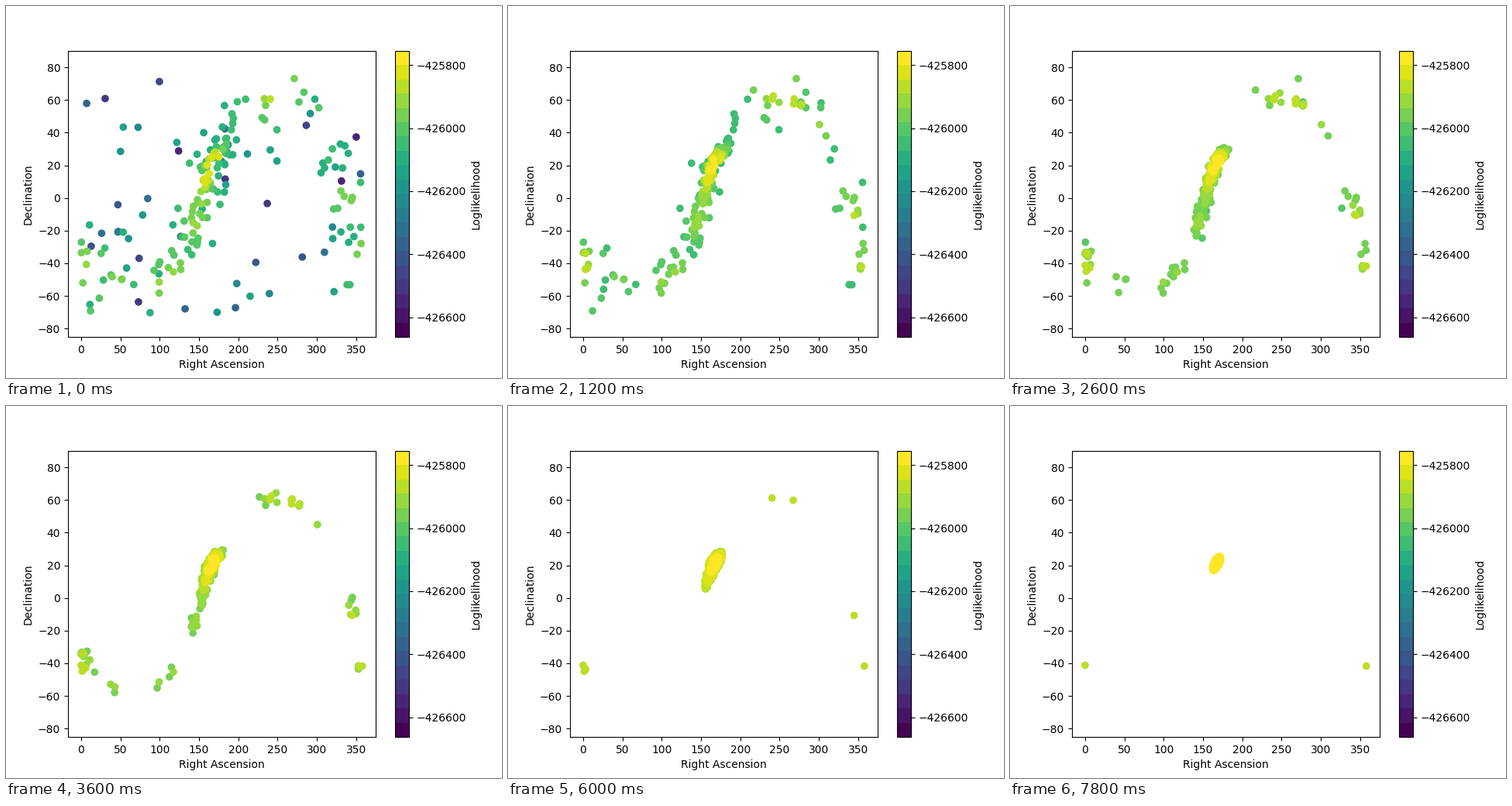
These frames come from a looping animation (640 by 480 pixels, 8 s). A matplotlib script:

```python
import numpy as np
import matplotlib.pyplot as plt
from matplotlib.animation import FuncAnimation

FRAMES, LIVE = 40, 200
LOW, HIGH = -426662.5, -425754.5      # log-likelihood range of the colour bar
rng = np.random.default_rng(11)

# Arcs of the ring that fade last: centre, half width, extra level
arcs = [(91, 17, .13), (128, 10, .13), (182, 13, .13), (228, 14, .14),
        (257, 7, .13), (297, 18, .12), (352, 25, .13)]

# Side maxima: ra, dec, level
spots = [(0, -41.2, 1), (358, -41.7, 1), (3, -43.8, .9), (345, -10.7, .9),
         (267.5, 59.9, .885), (240.5, 61.3, .88), (277.5, 57.2, .86),
         (2, -34, .865), (354.5, -42, .855)]


def threshold(k):
    """Lowest level that is still alive at step k."""
    return np.interp(k, [0, 1, 3, 9, 13, 23, 30, 39],
                     [0, .35, .62, .69, .745, .835, .87, .96])


def wrap(a):
    return (a + 180) % 360 - 180


def stack(ra, dec, level, is_spot=0):
    return np.column_stack([ra, dec, level, np.full(len(ra), is_spot)])


def ring(n, t):
    """Samples scattered about a tilted circle on the sky."""
    phi = np.where(rng.random(n) < .35, rng.normal(15, 32, n),
                   rng.uniform(0, 360, n))
    off = rng.normal(0, 2 + 10 * max(0, 1 - t / .75) ** 2, n)
    bump = np.max([h * np.exp(-(wrap(phi - c) / w) ** 4)
                   for c, w, h in arcs], axis=0)
    level = .69 + bump - .006 * np.abs(off) + rng.normal(0, .012, n)

    # the circle sags a little just past the main peak
    sag = 7 * np.exp(-(wrap(phi - 45) / 15) ** 2)
    a, lat, top = np.radians(phi), np.radians(off + 2.2 - sag), np.radians(245.5)
    side, up = np.cos(lat) * np.cos(a), np.cos(lat) * np.sin(a)
    ra = top + np.arctan2(-side, .5 * up - .866 * np.sin(lat))
    dec = np.arcsin(np.clip(.866 * up + .5 * np.sin(lat), -1, 1))
    return stack(np.degrees(ra) % 360, np.degrees(dec), level)


def peak(n):
    """Samples about the main maximum, along a short bent axis."""
    s, w = rng.normal(-5, 13, n), rng.normal(0, 3.5, n)
    fall = np.where(s < 0, -.0085 * s, .0013 * s**2)
    return stack(167 + .9 * s + .01 * s**2 + w,
                 21 + .85 * s - .012 * s**2 - .35 * w,
                 1 - fall - .004 * w**2)


def strays(n):
    """Samples spread evenly over the sky."""
    return stack(rng.uniform(1, 357, n),
                 np.degrees(np.arcsin(rng.uniform(-.975, .99, n))),
                 .66 * np.sqrt(rng.random(n)))


def islands():
    """Each side maximum with a few lower companions."""
    rows = []
    for ra, dec, level in spots:
        rows.append((ra, dec, level))
        for _ in range(3 if level < 1 else 0):
            dx, dy = rng.normal(0, [2.5, 1.5])
            rows.append(((ra + dx) % 360, dec + dy,
                         level - .015 * np.hypot(dx, dy)))
    return stack(*np.transpose(rows), 1)


def draw(count, t, n=6000):
    """New samples whose level lies above t."""
    new = np.where(rng.random((n, 1)) < .08 + .9 * t, peak(n), ring(n, t))
    return new[new[:, 2] > max(t, .5)][:count]


def run():
    """Live samples (ra, dec, level, is spot) for every step."""
    live, isles = strays(50), islands()
    birth = rng.integers(0, 13, len(isles))
    steps = []
    for k in range(FRAMES):
        t = threshold(k)
        live = np.vstack([live, isles[birth == k]])
        live = live[live[:, 2] >= t]
        live = np.vstack([live, draw(max(0, LIVE - len(live)), t)])
        steps.append(live[np.argsort(live[:, 2])])
    return steps


steps = run()

fig, ax = plt.subplots(figsize=(6.4, 4.8), dpi=100)
dots = ax.scatter([], [], c=[], cmap=plt.get_cmap("viridis", 20),
                  vmin=LOW, vmax=HIGH)
ax.set(xlim=(-16.72, 374.78), ylim=(-85.22, 90.28),
       xlabel="Right Ascension", ylabel="Declination")
bar = fig.colorbar(dots, ax=ax, label="Loglikelihood",
                   ticks=np.arange(-426600, -425799, 200))
bar.formatter.set_useOffset(False)
bar.update_ticks()


def update(k):
    ra, dec, level, is_spot = steps[k].T
    shade = np.where(is_spot > 0, np.minimum(level, .89), level)
    dots.set_offsets(np.column_stack([ra, dec]))
    dots.set_array(LOW + (HIGH - LOW) * shade)
    return dots,


anim = FuncAnimation(fig, update, frames=FRAMES, interval=200,
                     repeat=True, repeat_delay=0)
plt.show()
```
